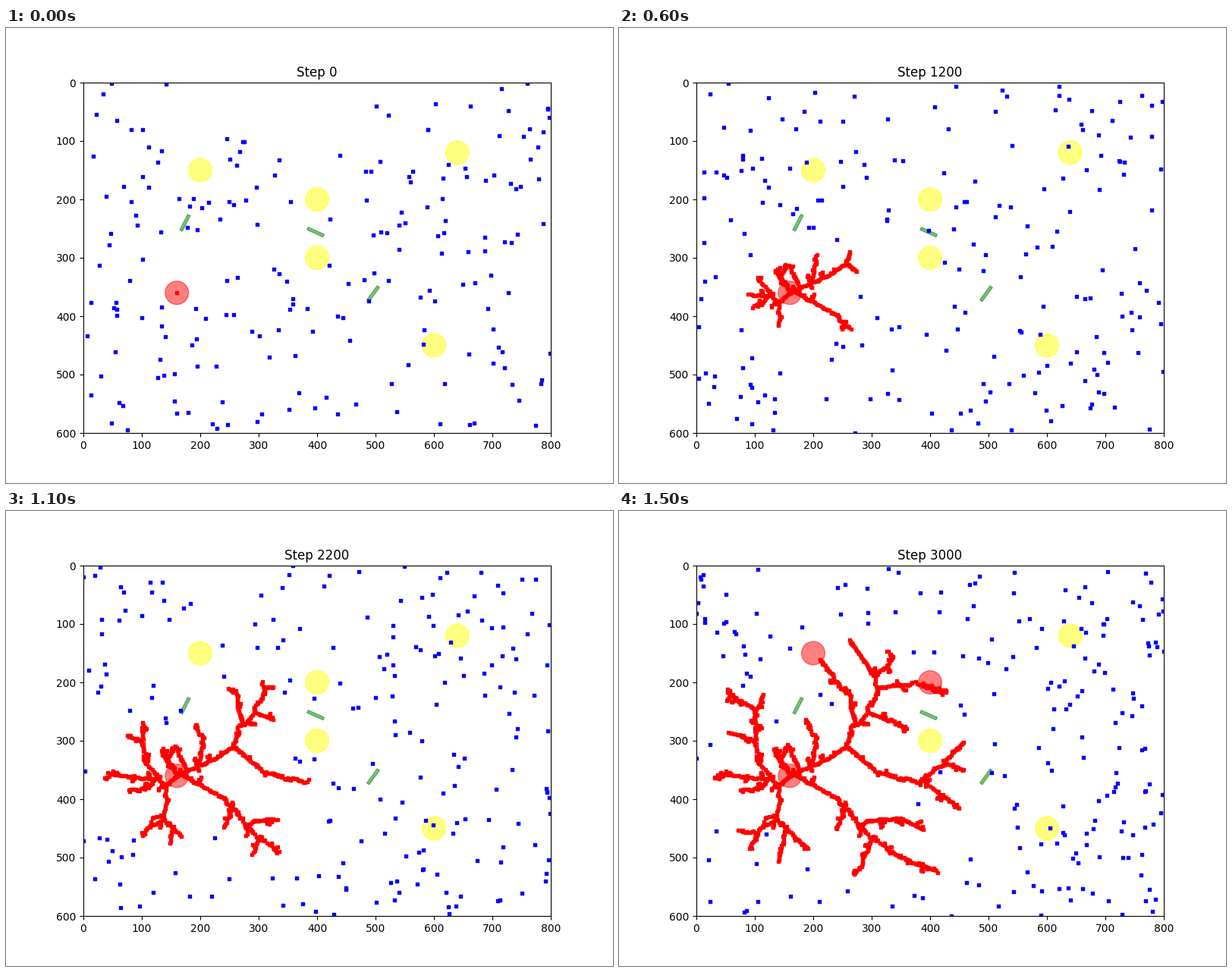
Recreate the animation shown at these times as a matplotlib script. Size 800 px wide and 600 px high, loop 1.6 s.

```python
import numpy as np
import matplotlib.pyplot as plt
from matplotlib.animation import FuncAnimation
from matplotlib.patches import Circle, Rectangle

FRAMES, INTERVAL, STEPS = 16, 100, 200
LAST = FRAMES - 1
WALKERS, SUBSTEPS, STRIDE = 200, 10, 12
ORIGIN, SIZE, SCALE = np.array([102, 72]), np.array([616, 462]), 0.77
SPEED = 9.5        # fastest start of a short limb, pixels per frame
AGE_COST = 5       # pixels a limb gives up to fork from an older cell
TWIGS = 70
rng = np.random.default_rng(7)

# Key points of each limb in stage pixels; its fork is found by a rule.
LIMBS = [
    [(258, 335), (298, 313), (308, 286), (323, 273), (340, 240), (338, 220), (304, 170)],
    [(303, 246), (265, 196)],
    [(392, 228), (430, 238)],
    [(361, 192)],
    [(379, 287)],
    [(342, 345), (395, 357), (426, 333), (454, 305)],
    [(447, 391)],
    [(454, 341)],
    [(259, 300), (246, 275)],
    [(258, 362), (288, 380), (333, 433), (383, 462), (418, 474)],
    [(333, 407), (368, 406), (401, 420)],
    [(321, 460), (310, 479)],
    [(286, 418)],
    [(211, 362), (209, 403), (231, 431), (249, 445)],
    [(182, 422), (172, 445)],
    [(157, 421)],
    [(210, 462)],
    [(204, 357), (186, 332), (180, 300), (179, 268), (190, 242)],
    [(143, 239)],
    [(130, 348)],
    [(144, 292)],
    [(188, 364), (160, 368)],
    [(222, 308)],
    [(204, 314)],
]


def fork(cluster, point):
    """Cell to branch from: near the point, but older cells are preferred."""
    gap = np.hypot(*(cluster[:, :2] - point).T)
    return cluster[np.argmin(gap + AGE_COST * cluster[:, 2])]


def grow(cluster, points, life=LAST):
    """Add one limb as cells of x, y and time; short limbs slow down."""
    base = fork(cluster, points[0])
    nodes = np.vstack([base[:2], points])
    run = np.r_[0, np.cumsum(np.hypot(*np.diff(nodes, axis=0).T))]
    length = run[-1]
    at = np.linspace(0, length, int(length / 2.4) + 2)
    cells = np.column_stack([np.interp(at, run, axis) for axis in nodes.T])

    span = min(LAST - base[2], life)
    power = max(1, SPEED * span / length)
    time = base[2] + span * (1 - (1 - at / length) ** (1 / power))

    sway = rng.normal(0, 0.7, (len(at) + 3, 2))
    sway = sum(sway[k:k + len(at)] for k in range(4))
    cells += sway * np.sin(np.pi * at / length)[:, None]
    cells = np.column_stack([cells, time])[1:]
    bumps = cells[rng.random(len(cells)) < 0.35]
    bumps[:, :2] += rng.uniform(-3, 3, (len(bumps), 2))
    return np.vstack([cluster, cells, bumps])


def build():
    cluster = np.array([[225, 349, 0.0]])
    for points in LIMBS:
        cluster = grow(cluster, points)
    for cell in rng.choice(cluster, TWIGS):
        angle, reach = rng.uniform(0, 2 * np.pi), rng.uniform(5, 10)
        tip = cell[:2] + reach * np.array([np.cos(angle), np.sin(angle)])
        cluster = grow(cluster, [tip], life=3)
    return cluster


def stuck(time):
    return cluster[cluster[:, 2] <= time + 1e-6, :2]


def touches(points, cells):
    gaps = points[:, None] - cells[None]
    return (np.abs(gaps).max(axis=2) < 6).any(axis=1)


def spawn(count):
    return ORIGIN + rng.random((count, 2)) * SIZE


def wander():
    """Random walks inside the box; walkers reaching the cluster start anew."""
    pos = spawn(WALKERS)
    history = [pos]
    for sub in range(1, LAST * SUBSTEPS + 1):
        cells = stuck(sub / SUBSTEPS)
        pos = pos + rng.normal(0, STRIDE, pos.shape)
        pos = ORIGIN + SIZE - np.abs(SIZE - np.abs(pos - ORIGIN))
        while (hit := touches(pos, cells)).any():
            pos[hit] = spawn(hit.sum())
        if sub % SUBSTEPS == 0:
            history.append(pos)
    return history


def to_data(points):
    return (points - ORIGIN) / SCALE


cluster = build()
walks = wander()

fig, ax = plt.subplots(figsize=(8, 6), dpi=100)
ax.set_xlim(0, 800)
ax.set_ylim(600, 0)
ax.set_aspect("equal")
title = ax.set_title("Step 0")

discs = [ax.add_patch(Circle(spot, 20, color="yellow", alpha=0.5))
         for spot in [(160, 360), (200, 150), (400, 200),
                      (400, 300), (640, 120), (600, 450)]]

for x, y, angle in [(174, 240, -63), (397.5, 256, 24), (496, 361.5, -54)]:
    ax.add_patch(Rectangle((x - 15, y - 2.5), 30, 5, angle=angle,
                           rotation_point="center", color="green", alpha=0.5))

walkers = ax.scatter([], [], s=5, c="blue", marker="s")
tree = ax.scatter([], [], s=10, c="red", marker="s")


def draw(frame):
    cells = to_data(stuck(frame))
    title.set_text(f"Step {frame * STEPS}")
    walkers.set_offsets(to_data(walks[frame]))
    tree.set_offsets(cells)
    for disc in discs:
        reached = np.hypot(*(cells - disc.center).T).min() < disc.radius
        disc.set_color("red" if reached else "yellow")
    return [title, walkers, tree, *discs]


anim = FuncAnimation(fig, draw, frames=FRAMES, init_func=lambda: draw(0),
                     interval=INTERVAL, repeat=True, repeat_delay=0)
plt.show()
```
